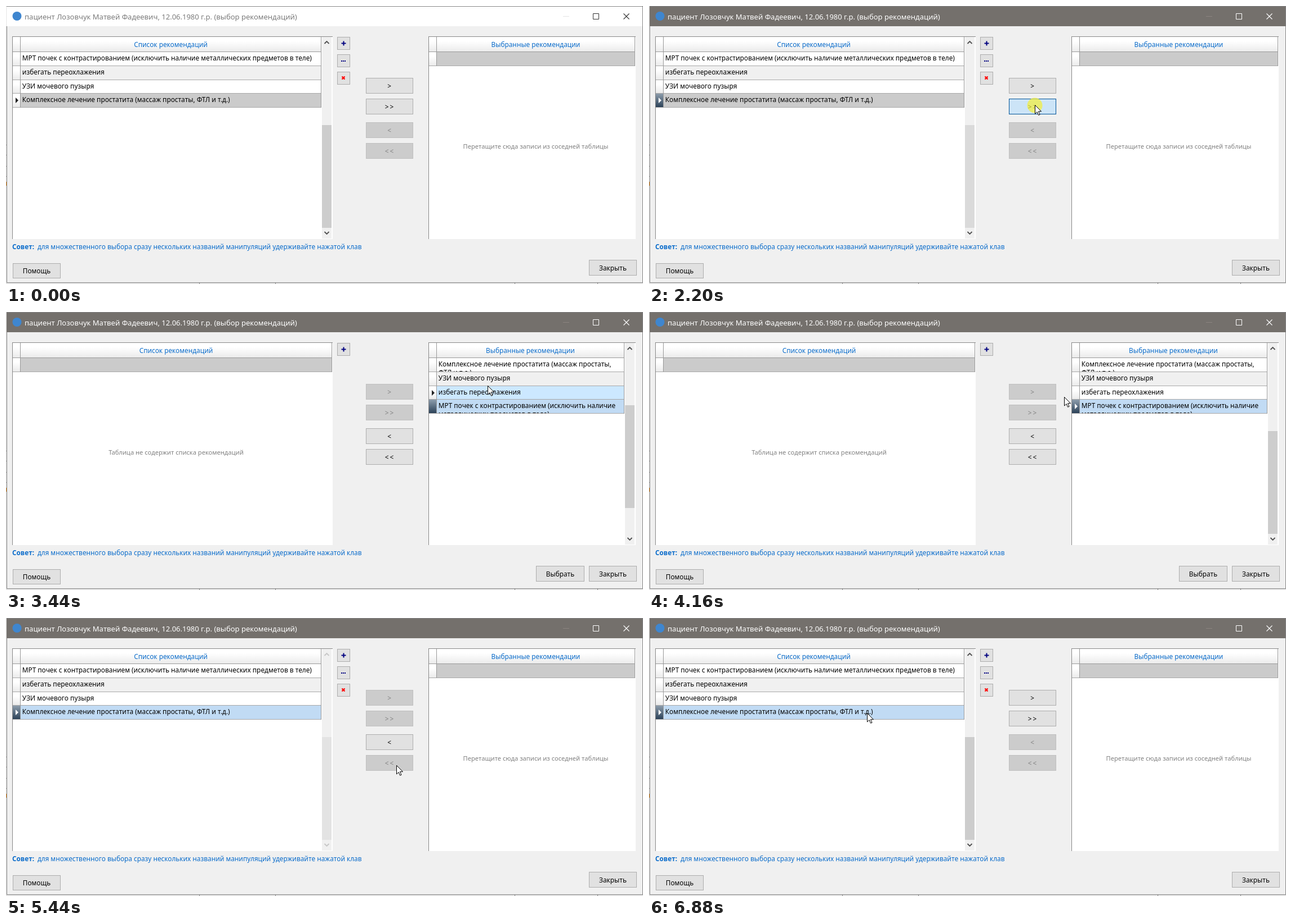
Write an HTML page that moves like this. It is 1131 px wide and 495 px high and loops after 7.88 s.

```html
<!DOCTYPE html>
<html lang="ru">
<head>
<meta charset="utf-8">
<title>Выбор рекомендаций</title>
<style>
html, body { margin: 0; width: 100%; height: 100%; overflow: hidden; background: #e6e6e6; }
svg { display: block; width: 100vw; height: 100vh; }
text { font-family: "Noto Sans", "Open Sans", sans-serif; font-size: 11.8px; white-space: pre; }
</style>
</head>
<body>
<svg id="stage" viewBox="0 0 1131 495">
  <defs>
    <linearGradient id="head" x2="0" y2="1">
      <stop offset=".3" stop-color="#fff"/><stop offset="1" stop-color="#ebebeb"/>
    </linearGradient>
    <linearGradient id="mark" x2="0" y2="1">
      <stop offset="0" stop-color="#8d9dac"/><stop offset="1" stop-color="#2c4258"/>
    </linearGradient>
  </defs>
  <g id="back"></g>
  <g id="scene"></g>
</svg>
<script>
const LOOP = 7880;
const BLUE = '#0a6ccb';
const ITEMS = [
  ['МРТ почек с контрастированием (исключить наличие', 'металлических предметов в теле)'],
  ['избегать переохлажения'],
  ['УЗИ мочевого пузыря'],
  ['Комплексное лечение простатита (массаж простаты,', 'ФТЛ и т.д.)']
];
const WIDE = ITEMS.map(parts => [parts.join(' ')]);
const NARROW = ITEMS.slice().reverse();

// Pointer path: time, x, y
const PATH = [
  [280, 668, 478], [720, 395, 163], [1160, 395, 163], [1720, 685, 176],
  [2600, 685, 176], [2720, 860, 116], [2840, 1081, 170], [2960, 960, 242],
  [3080, 872, 168], [3280, 872, 168], [3440, 855, 131], [3600, 846, 90],
  [3800, 846, 90], [4040, 835, 168], [4160, 737, 151], [4520, 688, 189],
  [4640, 688, 189], [5080, 693, 262], [5600, 693, 262], [6000, 398, 169],
  [6080, 398, 169], [6400, 392, 90], [6640, 392, 90], [6880, 387, 169]
];

const within = (t, a, b) => t >= a && t < b;
const clamp = (v, a, b) => Math.min(b, Math.max(a, v));

const rect = (x, y, w, h, fill) =>
  `<rect x="${x}" y="${y}" width="${w}" height="${h}" fill="${fill}"/>`;
const box = (x, y, w, h, fill, stroke) =>
  `<rect x="${x + .5}" y="${y + .5}" width="${w - 1}" height="${h - 1}" fill="${fill}" stroke="${stroke}"/>`;
const text = (x, y, s, fill = '#000', attrs = '') =>
  `<text x="${x}" y="${y}" fill="${fill}" ${attrs}>${s.replace(/</g, '&lt;')}</text>`;
const mid = (x, y, s, fill, size = 11.8) =>
  text(x, y, s, fill, `text-anchor="middle" style="font-size:${size}px"`);
const line = (d, color, width = 1) =>
  `<path d="${d}" fill="none" stroke="${color}" stroke-width="${width}"/>`;

function pointer(t) {
  if (t < PATH[0][0]) return null;
  const i = PATH.findIndex(p => p[0] > t);
  if (i < 0) return PATH[PATH.length - 1].slice(1);
  const [a, x, y] = PATH[i - 1], [b, x2, y2] = PATH[i];
  const k = (t - a) / (b - a);
  return [Math.round(x + (x2 - x) * k), Math.round(y + (y2 - y) * k)];
}

function button(x, y, w, h, label, state = 'normal') {
  const [fill, stroke, ink] = {
    normal: ['#e1e1e1', '#adadad', '#000'],
    off: ['#ccc', '#bfbfbf', '#838383'],
    hover: ['#e5f1fb', '#0078d7', '#000'],
    down: ['#cce4f7', '#005499', '#000']
  }[state];
  const arrow = /[<>]/.test(label);
  return box(x, y, w, h, fill, stroke) +
    text(x + w / 2 + (arrow ? .5 : 0), y + h / 2 + 4.5, label, ink,
      `text-anchor="middle"${arrow ? ' letter-spacing="2"' : ''}`);
}

function titleBar(active) {
  const ink = active ? '#fff' : '#333';
  return rect(1, 1, 1129, 35, active ? '#74706c' : '#fff') +
    '<circle cx="19.5" cy="18" r="8" fill="#3f86cf"/>' +
    text(33, 23.5, 'пациент Лозовчук Матвей Фадеевич, 12.06.1980 г.р. (выбор рекомендаций)',
      active ? '#fff' : '#7b7b7b', 'style="font-size:13px"') +
    line('M989 18.5h11', active ? '#8b8480' : '#e4e4e4') +
    line('M1042.5 13.5h10v10h-10z', ink) +
    line('M1096.5 13.5l10 10m0 -10l-10 10', ink, 1.1);
}

function scrollBar(x, row, ink, thumb) {
  const c = x + 8.5;
  return rect(x, 55, 17, 359, '#f0f0f0') +
    rect(x, 74 + 46 * row, 17, 183, thumb) +
    line(`M${c - 4} 67l4 -4l4 4M${c - 4} 402l4 4l4 -4`, ink, 1.8);
}

// A table with an indicator column, a header and up to four rows
function grid(x, w, title, note, rows, look) {
  const right = x + w - (rows.length ? 21 : 2), cell = x + 15;
  let s = rect(x, 54, w, 361, '#fff') + rect(x, 54, w, 1, '#888') + rect(x, 54, 1, 361, '#888') +
    rect(x + 1, 55, right - x, 26, 'url(#head)') +
    rect(x + 1, 81, right - x, 1, '#9a9a9a') +
    mid((cell + right) / 2, 72.5, title, BLUE);
  if (rows.length) {
    rows.forEach((parts, i) => {
      const top = Math.round(82 + i * 24.75), next = Math.round(82 + (i + 1) * 24.75);
      const h = next - top - 1;
      const last = i === 3;
      let fill = i === 1 ? '#f0f0f0' : '#fff';
      if (last) fill = look.focus ? '#c1dbf4' : '#cbcbcb';
      else if (i >= look.row) fill = '#cce8ff';
      s += rect(cell, top, right - cell, h, fill) +
        rect(x + 1, top, 13, h, last && look.active ? 'url(#mark)' : 'url(#head)') +
        rect(x + 1, next - 1, right - x, 1, '#a8a8a8');
      if (i === look.row) {
        s += `<path d="M${x + 6} ${top + 7}l5 5l-5 5z" fill="${last && look.active ? '#fff' : '#222'}"/>`;
      }
      s += `<svg x="${cell}" y="${top}" width="${right - cell}" height="${h}">` +
        parts.map((p, n) => text(2.8, 14.6 + 15 * n, p)).join('') + '</svg>';
    });
    s += scrollBar(right + 2, look.row, look.ink, look.thumb);
  } else {
    s += rect(cell, 82, right - cell, 24, '#cbcbcb') +
      rect(x + 1, 82, 13, 24, 'url(#head)') +
      rect(x + 1, 106, right - x, 1, '#a8a8a8') +
      mid((cell + right) / 2, 253.5, note, '#808080', 11.1);
  }
  const height = rows.length ? 126 : 52;
  return s + rect(x + 14, 55, 1, height, '#999') + rect(right, 55, 1, height, '#999');
}

function sideButtons(full) {
  const y = full ? [55, 86, 117] : [55];
  let s = y.map(v => box(588, v, 23, 23, '#e1e1e1', '#adadad')).join('') +
    line('M595.5 66.5h8m-4 -4v8', '#000080', 2);
  if (full) {
    s += [595, 598, 601].map(x => rect(x, 97, 2, 2, '#000080')).join('') +
      line('M596.5 125.5l5 5m0 -5l-5 5', '#f00', 2.2);
  }
  return s;
}

function moveButtons(t, moved, at) {
  const on = within(t, 5440, 5520) ? [0, 0, 1, 0] : moved ? [0, 0, 1, 1] : [1, 1, 0, 0];
  const down = within(t, 2120, 2280) || within(t, 5280, 5440);
  return ['>', '>>', '<', '<<'].map((label, i) => {
    const y = [128, 165, 207, 244][i];
    const over = at && within(at[0], 639, 723) && within(at[1], y, y + 28);
    const state = !on[i] ? 'off' : !over ? 'normal' : down ? 'down' : 'hover';
    return button(639, y, 84, 28, label, state);
  }).join('');
}

const cursor = ([x, y]) =>
  `<path transform="translate(${x + .5} ${y})" d="M0 .5V16l3.6 -3.4l2.5 5.7l2.4 -1l-2.5 -5.6h5z" fill="#fff" stroke="#000"/>`;

function scene(t) {
  const at = pointer(t);
  const active = t >= 1000;
  const moved = within(t, 2280, 5440);
  const drag = within(t, 3280, 4120) || t >= 6080;
  const row = drag ? clamp(Math.floor((at[1] - 81.5) / 24.6), 0, 3) : 3;
  const waking = within(t, 1000, 1400), appearing = within(t, 5440, 5600);
  const look = {
    active, row,
    focus: within(t, 1000, 2120) || t >= 3280,
    ink: waking ? '#a0a0a0' : appearing ? '#c6c6c6' : '#505050',
    thumb: appearing ? '#e3e3e3' : waking || within(t, 1800, 2280) ? '#dadada' : '#cdcdcd'
  };
  const click = within(t, 1080, 1160) || within(t, 2120, 2280) || within(t, 5280, 5440);

  return titleBar(active) +
    grid(11, 569, 'Список рекомендаций', 'Таблица не содержит списка рекомендаций', moved ? [] : WIDE, look) +
    grid(750, 368, 'Выбранные рекомендации', 'Перетащите сюда записи из соседней таблицы', moved ? NARROW : [], look) +
    sideButtons(!moved) +
    moveButtons(t, moved, at) +
    (moved ? button(941, 452, 86, 28, 'Выбрать') : '') +
    (click ? `<circle cx="${at[0]}" cy="${at[1] + 1}" r="13.5" fill="#f2ee3c" opacity=".72"/>` : '') +
    (at ? cursor(at) : '');
}

document.getElementById('back').innerHTML =
  rect(0, 0, 1131, 495, '#e6e6e6') +
  [343, 478, 903, 1050].map(x => rect(x, 0, 1, 495, '#888')).join('') +
  [247, 265, 285, 303].map(y => rect(0, y, 1, 1, '#999')).join('') +
  rect(0, 313, 1, 7, '#e08a20') +
  box(1, 0, 1130, 493, '#f0f0f0', '#858585') +
  text(11, 433.3, 'Совет:', BLUE, 'font-weight="700"') +
  text(56, 433.3, 'для множественного выбора сразу нескольких названий манипуляций удерживайте нажатой клав', BLUE) +
  button(12, 458, 85, 27, 'Помощь') +
  button(1035, 452, 85, 28, 'Закрыть');

const layer = document.getElementById('scene');
const start = performance.now();
let shown = -1;

// The picture advances in 80 ms ticks
function draw(now) {
  const t = Math.max(0, now - start) % LOOP;
  const shift = t < 2520 ? 40 : 0;
  const tick = Math.max(0, Math.floor((t - shift) / 80) * 80 + shift);
  if (tick !== shown) {
    layer.innerHTML = scene(tick);
    shown = tick;
  }
  requestAnimationFrame(draw);
}
draw(start);
</script>
</body>
</html>
```
